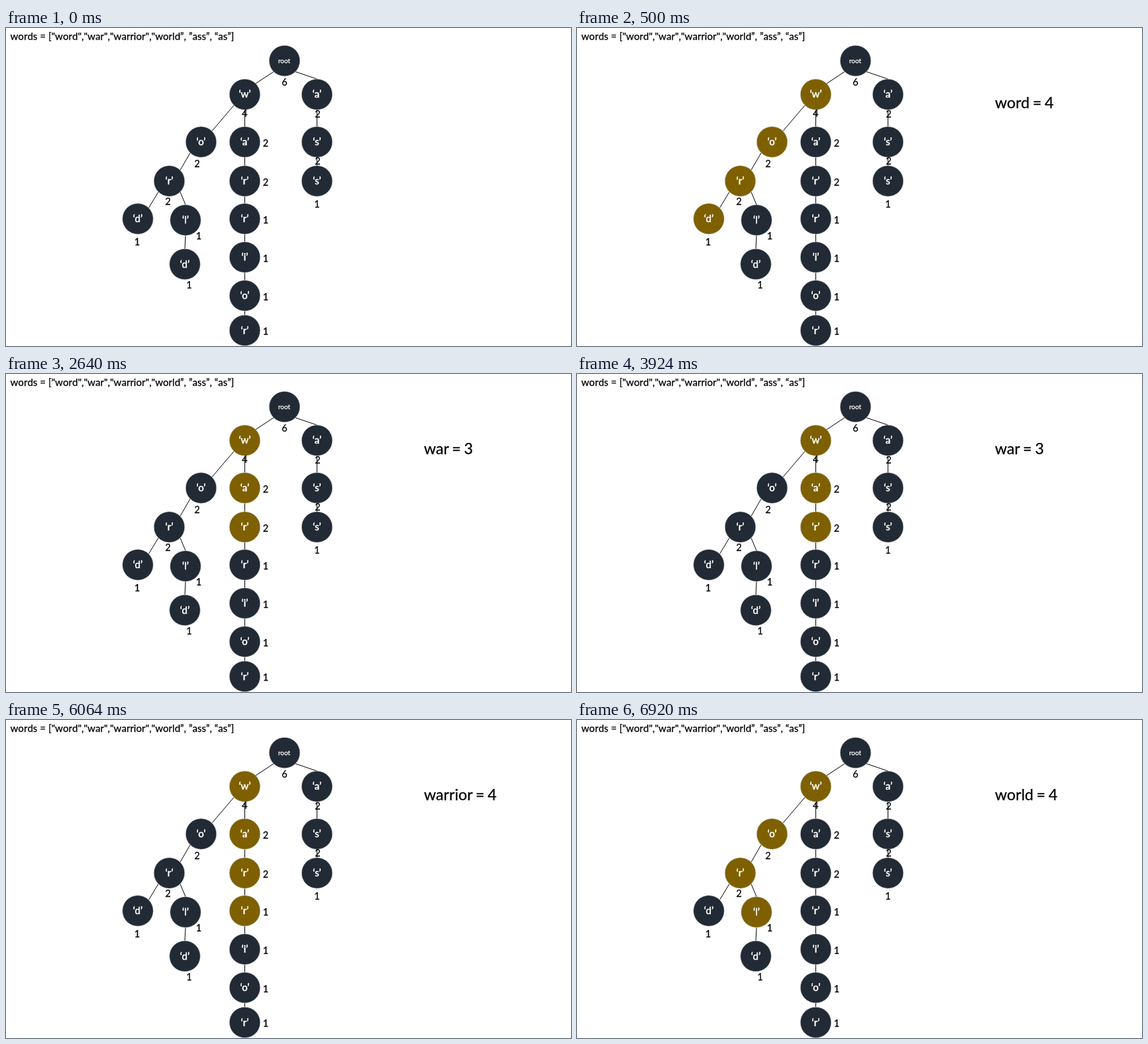
An HTML page that plays this animation: 853x480 px, repeating every 8 s.

```html
<!DOCTYPE html>
<html lang="en">
<head>
<meta charset="utf-8">
<title>Shortest unique prefixes in a trie</title>
<style>
  html, body { margin: 0; width: 100%; height: 100%; overflow: hidden; background: #fff; }
  svg { display: block; width: 853px; height: 480px; font-family: Lato, Carlito, sans-serif; }
  line { stroke: #000; stroke-width: 1; }
  circle { fill: #222a35; stroke: #d5d8dc; stroke-width: .6; }
  circle.on { fill: #7f6000; }
  text { stroke: #000; stroke-width: .25; }
  .key, .count { text-anchor: middle; }
  .key { fill: #fff; stroke: #fff; stroke-width: .55; font-size: 15px; }
  .root { font-size: 9.9px; stroke-width: .3; }
  .count { font-size: 14.6px; }
  .words { font-size: 15.1px; font-kerning: none; }
  .answer { font-size: 23.2px; word-spacing: -.05em; }
</style>
</head>
<body>
<svg viewBox="0 0 853 480"></svg>
<script>
const svg = document.querySelector('svg');
const words = ['word', 'war', 'warrior', 'world', 'ass', 'as'];
const R = 23.3, PERIOD = 8000, FIRST = 500, STEP = 2140;

// Height of each level of the trie
const rows = [49.5, 100.3, 172, 231, 288, 346, 404, 456.5];

// Where branches bend: x, y and the offset of the count.
// Any other node continues straight below its parent.
const bends = {
  '': [420.5, rows[0], 0, 32.5],
  w: [360.5, rows[1], 0, 28.5],
  wo: [294.5, rows[2], -6, 33],
  wor: [246.5, rows[3], -2, 31],
  word: [199, rows[4], -1, 35],
  worl: [271, 290, 20, 24],
  world: [270, 356.5, 6.5, 31.5],
  wa: [360.5, rows[2], 31.5, 1.5],
  a: [469.5, rows[1], 1, 29],
  ass: [469.5, rows[3], 0, 35]
};

const trie = new Map();
for (const word of words) {
  for (let n = 0; n <= word.length; n++) {
    const prefix = word.slice(0, n);
    if (!trie.has(prefix)) {
      const parent = n ? trie.get(prefix.slice(0, -1)) : null;
      const [x, y, dx, dy] = bends[prefix] || [parent.x, rows[n], parent.dx, parent.dy];
      trie.set(prefix, { prefix, parent, x, y, dx, dy, count: 0 });
    }
    trie.get(prefix).count++;
  }
}
const nodes = [...trie.values()];

function add(tag, attrs, text = '') {
  const el = document.createElementNS('http://www.w3.org/2000/svg', tag);
  for (const name in attrs) el.setAttribute(name, attrs[name]);
  el.textContent = text;
  return svg.appendChild(el);
}

const label = (cls, x, y, text) => add('text', { class: cls, x, y }, text);

// Edges join the rims: diagonal points for side branches, else bottom to top
function drawEdge({ x, y, parent }) {
  const side = Math.abs(x - parent.x) > 1 ? Math.sign(x - parent.x) : 0;
  const d = R * Math.SQRT1_2;
  add('line', {
    x1: parent.x + side * d, y1: parent.y + (side ? d : R),
    x2: side < 0 ? x + d : x, y2: y - (side < 0 ? d : R)
  });
}

function drawNode(node) {
  const { prefix, x, y } = node;
  node.disc = add('circle', { cx: x, cy: y, r: R });
  if (prefix) label('key', x, y + 5, `‘${prefix.at(-1)}’`);
  else label('key root', x - .5, y + 3.2, 'root');
}

nodes.filter(node => node.parent).forEach(drawEdge);
nodes.forEach(drawNode);
nodes.forEach(({ x, y, dx, dy, count }) => label('count', x + dx, y + dy + 5.2, count));

label('words', 6.5, 18, 'words = ["word","war","warrior","world”, ”ass”, “as”]');
const answer = label('answer', 631, 121, '');

// Shortest prefix owned by one word, or the whole word
function shortest(word) {
  let n = 1;
  while (n < word.length && trie.get(word.slice(0, n)).count > 1) n++;
  return word.slice(0, n);
}

let shown;
function draw(time) {
  const step = Math.floor((time % PERIOD - FIRST) / STEP);
  if (step === shown) return;
  shown = step;
  const word = words[step];
  const found = word ? shortest(word) : '';
  answer.textContent = word ? `${word} = ${found.length}` : '';
  for (const { prefix, disc } of nodes) {
    disc.classList.toggle('on', prefix !== '' && found.startsWith(prefix));
  }
}

const begin = performance.now();
function tick() {
  draw(performance.now() - begin);
  requestAnimationFrame(tick);
}
tick();
</script>
</body>
</html>
```
